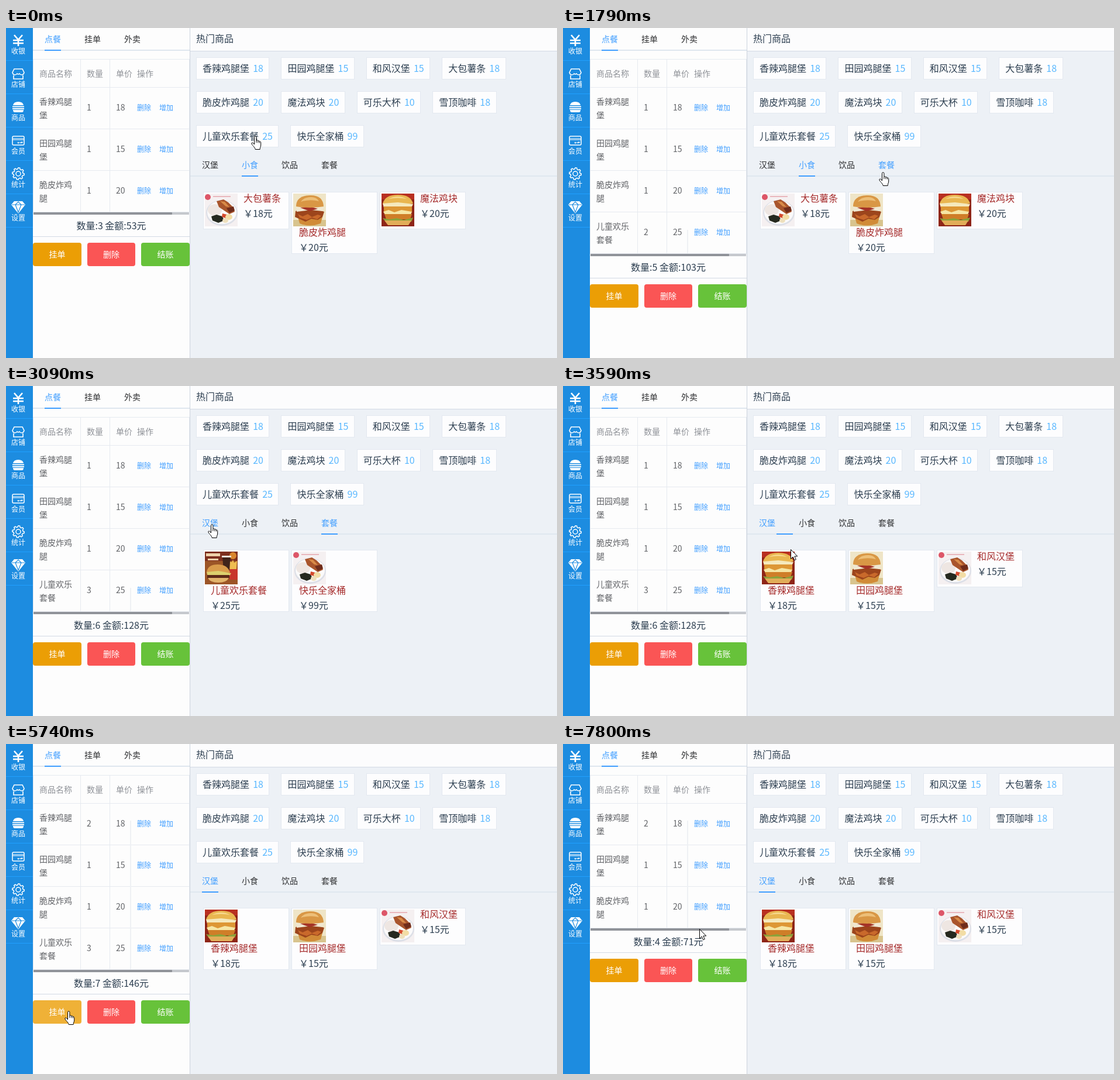
An HTML page that plays this animation: 942 by 564 pixels, repeating every 8000 ms.

```html
<!DOCTYPE html>
<html lang="zh-CN">
<head>
<meta charset="utf-8">
<title>收银</title>
<style>
  html, body { margin: 0; width: 100%; height: 100%; overflow: hidden; background: #edf1f6; }
  svg { display: block; }
  text { font-family: "Noto Sans CJK SC", "Noto Sans CJK", sans-serif; white-space: pre; }
</style>
</head>
<body>
<svg id="stage" width="942" height="564" viewBox="0 0 942 564">
  <defs>
    <clipPath id="photo"><path d="M0 0h56v56H0z"/></clipPath>
    <g id="plate" clip-path="url(#photo)">
      <path d="M0 0h56v56H0z" fill="#f5f0f1"/>
      <path d="M14 4h30v2H14z" fill="#e9b7bd"/>
      <circle cx="5" cy="6" r="5" fill="#dd5668"/>
      <ellipse cx="29" cy="33" rx="27" ry="22" fill="#dcdfe7"/>
      <ellipse cx="29" cy="32" rx="25" ry="20" fill="#fbfafa"/>
      <ellipse cx="17" cy="28" rx="12" ry="10" fill="#eee6e2"/>
      <path d="M20 13l12-3 8 5 8 8 3 8-9 4-9-6-9-6z" fill="#a9552c"/>
      <path d="M26 13l8 1 8 9-6-1z" fill="#d98b48"/>
      <path d="M37 25l12-3 2 7-9 4z" fill="#6f2c1b"/>
      <path d="M11 39l9-3 10 3 3 7-10 4-10-4z" fill="#25291f"/>
      <path d="M30 34l8 2-2 6-7-2z" fill="#d4492d"/>
      <ellipse cx="41" cy="40" rx="6" ry="5" fill="#f2dda5"/>
      <ellipse cx="35" cy="46" rx="5" ry="4" fill="#eee0bd"/>
    </g>
    <g id="burger" clip-path="url(#photo)">
      <path d="M0 0h56v56H0z" fill="#efe5c7"/>
      <path d="M0 45h56v11H0z" fill="#d8c48e"/>
      <path d="M8 40h42l-3 11q-18 7-36 0z" fill="#d18b37"/>
      <path d="M4 30l14-5 20 1 15 5-3 9-8 5-11-2-10 5-11-5-7-3z" fill="#9c451c"/>
      <path d="M8 35l8 4 9-4 7 5 10-4 6 2-7 6-9-3-9 4-12-4z" fill="#c9692b"/>
      <path d="M5 23l24-4 23 5-2 6-20-2-24 3z" fill="#f0e8d2"/>
      <path d="M12 24l16-2 14 4-14 4z" fill="#a43327"/>
      <path d="M5 22Q5 4 28 3t24 19q-23 4-47 0z" fill="#d99745"/>
      <path d="M13 14Q18 6 31 6q9 0 13 7-16-4-31 1z" fill="#edbf78"/>
    </g>
    <g id="double" clip-path="url(#photo)">
      <path d="M0 0h56v56H0z" fill="#8e2518"/>
      <path d="M0 0h56v10H0z" fill="#b83021"/>
      <path d="M2 17Q6 2 28 2t26 15q-25 5-52 0z" fill="#e9b650"/>
      <path d="M12 9Q28 1 43 9q-15-3-31 0z" fill="#f7db92"/>
      <path d="M2 17l26-2 26 3-3 6-23-2-24 2z" fill="#f5e9bd"/>
      <path d="M4 22h48v10H4z" fill="#dd9735"/>
      <path d="M3 31l9-3 10 4 12-4 18 3-2 5H6z" fill="#f6e6a4"/>
      <path d="M5 35h47l-3 9H8z" fill="#cf7e28"/>
      <path d="M2 42l12 2 12-2 12 3 16-4-3 7H7z" fill="#8aa33b"/>
      <path d="M5 46h46l-5 8H11z" fill="#e2ad59"/>
    </g>
    <g id="combo" clip-path="url(#photo)">
      <path d="M0 0h56v56H0z" fill="#9c5527"/>
      <path d="M0 0h56v16H0z" fill="#7d2f1f"/>
      <path d="M2 3h24v5H2zM5 12h18v3H5z" fill="#efd2aa"/>
      <circle cx="48" cy="7" r="6" fill="#d9862e"/>
      <path d="M30 9h14l-2 24H32z" fill="#40231a"/>
      <path d="M29 7h16v3H29z" fill="#eee6dc"/>
      <path d="M43 17l3 1 2-4 2 5 5-3-2 24H42z" fill="#efbd50"/>
      <path d="M42 30h14v18H42z" fill="#c8352c"/>
      <path d="M3 35Q5 22 22 22t21 14z" fill="#d99b4b"/>
      <path d="M3 35l20-2 22 4-4 6H5z" fill="#dcd06d"/>
      <path d="M4 40h38v6H4z" fill="#5d2a18"/>
      <path d="M5 45h36q-4 8-18 8T5 45z" fill="#e2b46c"/>
    </g>
    <path id="arrow" d="M.5 .5V16.5L4.2 13 6.7 18.7 9.3 17.6 6.9 12H11.8Z" fill="#fff" stroke="#000"/>
    <g id="hand" stroke="#000" stroke-linejoin="round">
      <path d="M5.5 15V2.5a1.7 1.7 0 0 1 3.4 0v6c.5-1 3-.8 3 .8.6-.8 2.6-.6 2.6 1 .7-.7 2.2-.2 2.2 1.4V16c0 3-1.6 4-1.6 7.5H7.2C7.2 20.5 2.4 17 1 14c-.7-1.6 1-2.8 2.4-1.6z" fill="#fff"/>
      <path d="M8.9 8.5V12M11.9 9.3v3M14.5 10.3v2.2" fill="none"/>
    </g>
  </defs>
  <g id="fixed"></g>
  <g id="live"></g>
</svg>
<script>
const BLUE = '#409eff', INK = '#2c3e50', GREY = '#606266', LINE = '#e6eaf0', RULE = '#dfe7ef', EDGE = '#ccd3dd';
const LOOP = 8000, ROW = 71, TABLE_TOP = 101;

const rect = (x, y, w, h, fill, extra = '') =>
  `<rect x="${x}" y="${y}" width="${w}" height="${h}" fill="${fill}" ${extra}/>`;
// cy is the vertical middle of the characters
const text = (x, cy, size, fill, str, anchor = 'start') =>
  `<text x="${x}" y="${cy + size * 0.38}" font-size="${size}" fill="${fill}" text-anchor="${anchor}">${str}</text>`;
const use = (id, x, y) => `<use href="#${id}" x="${x}" y="${y}"/>`;
const box = (x, y, w, h) => rect(x + .5, y + .5, w - 1, h - 1, '#fdfdfe', 'stroke="#e3e8f0"');

const gear = Array.from({ length: 48 }, (_, i) => {
  const a = i * Math.PI / 24, r = i % 6 < 3 ? 10.2 : 8;
  return `${(r * Math.cos(a)).toFixed(1)} ${(r * Math.sin(a)).toFixed(1)}`;
}).join('L');

const MENU = [
  ['收银', '<path d="M-7-9L0-1 7-9M0-1V10M-9 0H9M-9 5H9" stroke-width="2.6"/>'],
  ['店铺', '<path d="M-7-8H7L10-2Q9 2 6 2T2 0Q0 2-2 0-3 2-6 2T-10-2ZM-8 3V9H8V3" stroke-width="1.6"/>'],
  ['商品', '<path d="M-9-3Q-8-9 0-9T9-3ZM-9 5H9Q9 9 6 9H-6Q-9 9-9 5Z" fill="#fff" stroke="none"/><path d="M-10-.5H10M-10 3H10" stroke-width="2"/>'],
  ['会员', '<rect x="-10" y="-7" width="20" height="15" rx="2" stroke-width="1.5"/><path d="M-10-3H10M-10-1H10M-1 3l1 2 1-2M3 3v2M5 5V3h2v1H5" stroke-width="1.2"/>'],
  ['统计', `<path d="M${gear}Z" stroke-width="1.5"/><circle r="4" stroke-width="1.5"/>`],
  ['设置', '<path d="M-7-10H7L12-4 0 11-12-4Z" fill="#fff" stroke="none"/><path d="M-11-4H11M-5-4L0 9 5-4 0-9Z" stroke="#1d8ce0" stroke-width="1.2"/>'],
];

const HOT = [
  [['香辣鸡腿堡', 18], ['田园鸡腿堡', 15], ['和风汉堡', 15], ['大包薯条', 18]],
  [['脆皮炸鸡腿', 20], ['魔法鸡块', 20], ['可乐大杯', 10], ['雪顶咖啡', 18]],
  [['儿童欢乐套餐', 25], ['快乐全家桶', 99]],
];
const ORDER = [['香辣鸡腿', '堡', 18], ['田园鸡腿', '堡', 15], ['脆皮炸鸡', '腿', 20], ['儿童欢乐', '套餐', 25]];
const TABS = ['汉堡', '小食', '饮品', '套餐'];
const GOODS = {
  0: [['double', '香辣鸡腿堡', 18], ['burger', '田园鸡腿堡', 15], ['plate', '和风汉堡', 15]],
  1: [['plate', '大包薯条', 18], ['burger', '脆皮炸鸡腿', 20], ['double', '魔法鸡块', 20]],
  3: [['combo', '儿童欢乐套餐', 25], ['plate', '快乐全家桶', 99]],
};
const BUTTONS = [
  ['挂单', 46, 83, '#eb9e05', '#efb137'],
  ['删除', 139, 82, '#fa5555', '#fb7777'],
  ['结账', 231, 83, '#67c23a', '#85ce61'],
];

function drawFixed() {
  let s = rect(0, 0, 46, 564, '#1d8ce0');
  MENU.forEach(([label, icon], i) => {
    const y = 57 * i;
    s += `<g transform="translate(21 ${y + 21})" fill="none" stroke="#fff">${icon}</g>`
      + text(21, y + 39, 12, '#fff', label, 'middle') + rect(0, y + 55, 46, 1, '#20a0ff');
  });
  s += rect(46, 0, 268, 564, '#fdfdfd') + rect(314, 0, 1, 564, EDGE);
  ['点餐', '挂单', '外卖'].forEach((label, i) => s += text(66 + 68 * i, 19, 14, i ? '#303133' : BLUE, label));
  s += rect(46, 37, 268, 2, RULE) + rect(66, 37, 28, 2, BLUE);
  [['商品名称', 57], ['数量', 138], ['单价', 188], ['操作', 224]].forEach(([label, x]) => s += text(x, 78, 14, '#909399', label));

  s += rect(315, 0, 627, 39, '#fcfcfd') + rect(315, 39, 627, 1, '#d3dae4') + text(325, 18, 16, INK, '热门商品');
  HOT.forEach((row, r) => {
    let x = 325;
    const y = 50 + 58 * r;
    for (const [name, price] of row) {
      const w = name.length * 16 + 45.4, left = Math.round(x), right = Math.round(x + w);
      s += box(left, y, right - left, 38) + text(x + 11, y + 19, 16, INK, name)
        + text(x + w - 10.5, y + 19, 16, '#58b7ff', price, 'end');
      x += w + 20;
    }
  });
  return s + rect(315, 252, 627, 2, RULE);
}

function drawOrder({ qty, row, btn, seam, link }) {
  const lines = ORDER.map((item, i) => [...item, qty[i], i]).filter(line => line[3]);
  const bottom = TABLE_TOP + lines.length * ROW;
  let s = '';
  lines.forEach(([first, second, price, n, i]) => {
    const y = TABLE_TOP + ROW * i;
    if (row === i) s += rect(47, y + 1, 266, ROW - 1, '#eaf2fd');
    s += text(57, y + 25, 14, GREY, first) + text(57, y + 48, 14, GREY, second)
      + text(138, y + 35, 14, GREY, n) + text(188, y + 35, 14, GREY, price)
      + text(224, y + 35, 12, link && row === i ? '#66b1ff' : BLUE, '删除') + text(262, y + 35, 12, BLUE, '增加')
      + rect(46, y + ROW, 268, 1, LINE);
  });
  s += rect(46, 53, 268, 1, LINE) + rect(46, TABLE_TOP, 268, 1, LINE);
  [46, 127, 177, 313].forEach(x => s += rect(x, 53, 1, bottom - 53, LINE));
  if (seam < bottom) s += rect(212, seam, 2, bottom - seam, '#eff1f4');

  const count = lines.reduce((sum, line) => sum + line[3], 0);
  const total = lines.reduce((sum, line) => sum + line[2] * line[3], 0);
  s += rect(47, bottom + 1, 266, 4, '#c5c8cd') + rect(47, bottom + 1, 237, 4, '#909399', 'rx="1"')
    + text(180, bottom + 24, 16, INK, `数量:${count} 金额:${total}元`, 'middle')
    + rect(46, bottom + 42, 268, 1, '#d3dae4');
  BUTTONS.forEach(([label, x, w, color, hover], i) =>
    s += rect(x, bottom + 53, w, 40, btn === i ? hover : color, 'rx="4"') + text(x + w / 2, bottom + 73, 14, '#fff', label, 'middle'));
  return s;
}

function drawGoods({ tab, over, bar }) {
  let s = rect(bar, 252, 28, 2, BLUE);
  TABS.forEach((label, i) => s += text(335 + 68 * i, 234, 14, i === tab || i === over ? BLUE : '#303133', label));
  GOODS[tab].forEach(([photo, name, price], i) => {
    const x = 337 + 151 * i, wraps = name.length > 4;
    const tx = x + (wraps ? 13 : 69), ty = wraps ? 349 : 291;
    s += box(x, 280, 147, wraps ? 106 : 64) + use(photo, x + 3, 283)
      + text(tx, ty, 16, '#a52a2a', name) + text(tx, ty + 26, 16, INK, `￥${price}元`);
  });
  return s;
}

// Each step changes only the listed parts of the state.
const STEPS = [
  [0, { cursor: ['hand', 419, 184], qty: [1, 1, 1, 0], tab: 1, bar: 403, over: -1, row: -1, btn: -1, seam: 999, link: false }],
  [520, { qty: [1, 1, 1, 1], seam: 345 }],
  [770, { qty: [1, 1, 1, 2] }],
  [1020, { cursor: ['arrow', 470, 207] }],
  [1270, { cursor: ['arrow', 515, 228] }],
  [1520, { cursor: ['hand', 540, 246], over: 3 }],
  [2040, { tab: 3, bar: 510 }],
  [2290, { cursor: ['arrow', 475, 260], bar: 539, over: -1 }],
  [2560, { cursor: ['hand', 413, 318] }],
  [2840, { qty: [1, 1, 1, 3] }],
  [3090, { cursor: ['hand', 345, 236], over: 0 }],
  [3590, { cursor: ['arrow', 389, 279], tab: 0, bar: 365, over: -1, seam: 999 }],
  [3860, { cursor: ['hand', 411, 316], bar: 335 }],
  [4110, { qty: [2, 1, 1, 3], seam: 131 }],
  [4390, { cursor: ['hand', 402, 320] }],
  [4660, { cursor: ['arrow', 281, 334], row: 3 }],
  [4940, { cursor: ['arrow', 273, 364] }],
  [5210, { cursor: ['arrow', 272, 387], row: -1 }],
  [5460, { cursor: ['arrow', 270, 407] }],
  [5740, { cursor: ['hand', 100, 456], btn: 0 }],
  [6240, { cursor: ['hand', 183, 456], btn: 1 }],
  [6510, { cursor: ['arrow', 218, 344], btn: -1, row: 3 }],
  [6780, { cursor: ['hand', 231, 349], link: true }],
  [7030, { cursor: ['hand', 225, 346] }],
  [7300, { cursor: ['arrow', 231, 346], qty: [2, 1, 1, 0], row: -1, link: false }],
  [7550, { cursor: ['arrow', 232, 332] }],
  [7800, { cursor: ['arrow', 233, 316] }],
];
let state = {};
const STATES = STEPS.map(([, change]) => state = { ...state, ...change });

const live = document.getElementById('live');
document.getElementById('fixed').innerHTML = drawFixed();
let shown = -1;
function render() {
  const t = performance.now() % LOOP;
  const index = STEPS.filter(([start]) => start <= t).length - 1;
  if (index !== shown) {
    const now = STATES[shown = index];
    live.innerHTML = drawOrder(now) + drawGoods(now) + use(...now.cursor);
  }
  requestAnimationFrame(render);
}
render();
</script>
</body>
</html>
```
